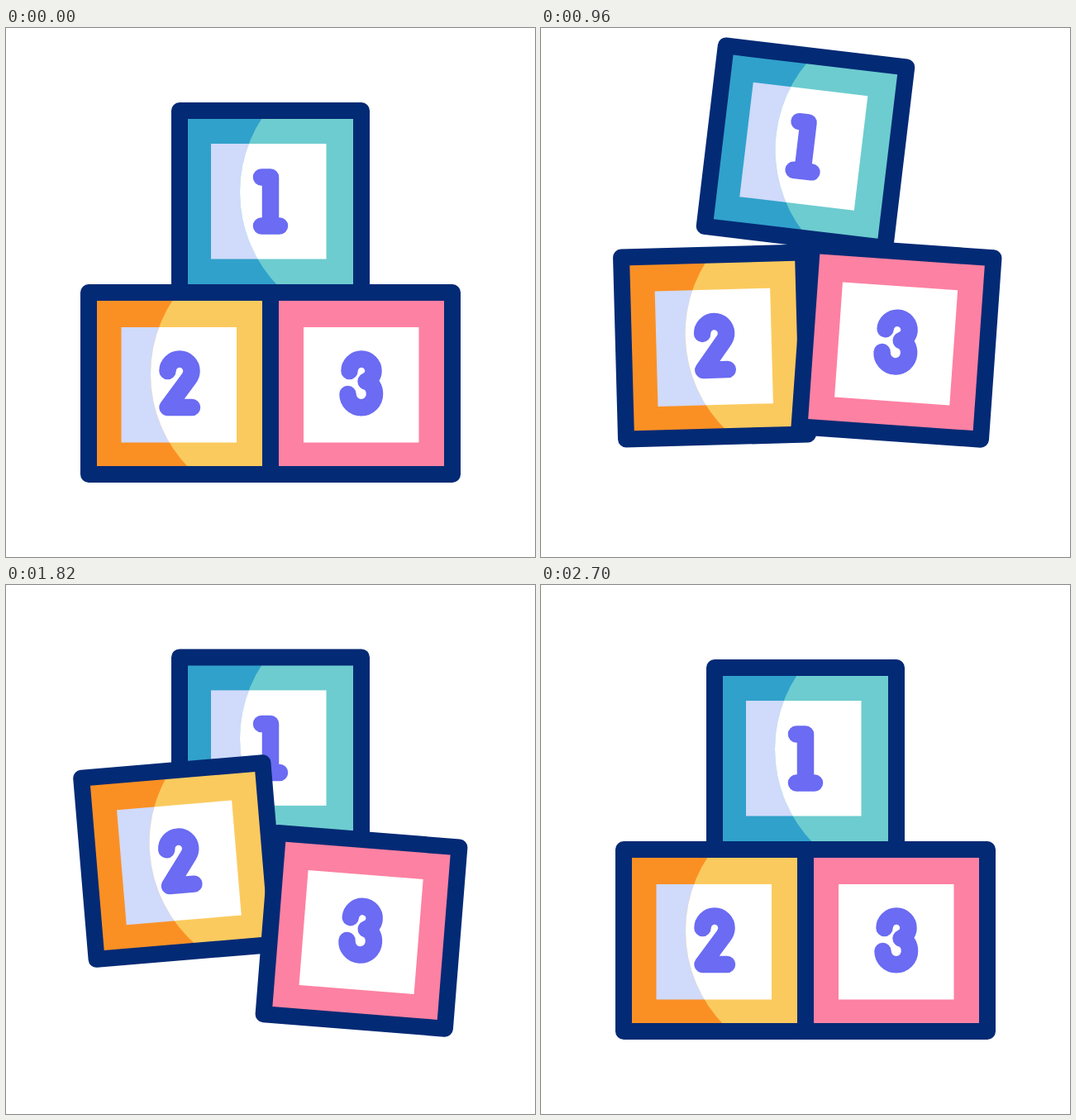
Write an HTML page that moves like this. It is 640 px wide and 640 px high and loops after 3000 ms.

```html
<!DOCTYPE html>
<html lang="en">
<head>
<meta charset="utf-8">
<title>Counting blocks</title>
<style>
html, body { margin: 0; width: 100%; height: 100%; overflow: hidden; background: #fff; }
svg { display: block; width: 100vw; height: 100vh; }
.edge { fill: none; stroke: #032a75; stroke-width: 20; stroke-linejoin: round; }
.digit { fill: none; stroke: #6b6bf3; stroke-width: 20.5; stroke-linecap: round; stroke-linejoin: round; }
</style>
</head>
<body>
<svg id="stage" viewBox="0 0 640 640" xmlns="http://www.w3.org/2000/svg"></svg>
<script>
const LOOP = 3000, STEP = 20;
const stage = document.getElementById('stage');

// Easings
const bez = (x1, x2) => x => {
  let lo = 0, hi = 1, s = 0.5;
  for (let i = 0; i < 24; i++) {
    const r = 1 - s;
    if (3 * r * r * s * x1 + 3 * r * s * s * x2 + s * s * s < x) lo = s; else hi = s;
    s = (lo + hi) / 2;
  }
  return s * s * (3 - 2 * s);
};
const fall = p => x => Math.pow(x, p);
const out = x => 1 - (1 - x) * (1 - x);
const smooth = x => x * x * (3 - 2 * x);

// Tracks hold [time, value, easing towards this key]
const blocks = [
  {
    x: 320, y: 210, fill: '#6dcccf', shade: '#30a1cb', panel: [-72, -70], curve: 126.5,
    digit: 'M-11,-29.5H0V29.5M-11,29.5H11',
    lift: [[210, 0], [1250, -75, bez(.33, .5)], [1270, -75, smooth], [1680, 0, fall(2)],
           [1980, -28, smooth], [2272, 0, fall(2)]],
    turn: [[200, 0], [850, 6.8, smooth], [1270, 6.8, smooth], [1680, 0, fall(2.2)],
           [1820, 0, smooth], [2040, 3.5, smooth], [2300, 0, fall(2)]]
  },
  {
    x: 210, y: 430, fill: '#fbca5e', shade: '#fa9024', panel: [-70.5, -68], curve: 128.5,
    digit: 'M-14.5,-15a14.5,14.5 0 0 1 29,0q0,5 -3.5,9.5L-14.5,29H15',
    lift: [[560, 0], [1840, -96, bez(.33, .2)], [2150, 0, fall(2)],
           [2400, -30, out], [2700, 0, fall(2)]],
    turn: [[560, 0], [1860, -4.8, bez(.33, .4)], [2150, 0, fall(2)],
           [2200, 0, smooth], [2450, -3.4, smooth], [2700, 0, fall(2)]]
  },
  {
    x: 430, y: 430, fill: '#fd81a2', panel: [-70, -68],
    digit: 'M-14.5,-15a14.5,14.5 0 0 1 29,0c0,6 -4,10.5 -9,12.5c7,2 10.5,8 10.5,15.5a16,16 0 0 1 -32.5,0',
    lift: [[330, 0], [1560, -96, smooth], [1840, -3.5, fall(1.25)],
           [2100, -27, out], [2380, 0, fall(2)]],
    turn: [[360, 0], [1580, 8.3, smooth], [1840, 3.9, fall(2)],
           [2180, 5, smooth], [2385, 0, fall(2.4)]]
  }
];

function add(parent, tag, attrs) {
  const el = document.createElementNS('http://www.w3.org/2000/svg', tag);
  for (const k in attrs) el.setAttribute(k, attrs[k]);
  parent.appendChild(el);
  return el;
}

function square(parent, x, y, size, attrs) {
  return add(parent, 'rect', { x, y, width: size, height: size, ...attrs });
}

function build(b, i) {
  const g = add(stage, 'g', {});
  const [px, py] = b.panel;
  square(g, -105, -105, 210, { fill: b.shade || b.fill });
  square(g, px, py, 139.5, { fill: b.shade ? '#d0dafa' : '#fff' });
  if (b.shade) {
    // The lit side is everything inside a large circle
    const clip = add(g, 'clipPath', { id: 'lit' + i });
    add(clip, 'circle', { cx: b.curve, cy: -11.5, r: 163.5 });
    const lit = add(g, 'g', { 'clip-path': `url(#lit${i})` });
    square(lit, -105, -105, 210, { fill: b.fill });
    square(lit, px, py, 139.5, { fill: '#fff' });
  }
  square(g, -110, -110, 220, { class: 'edge' });
  add(g, 'path', { d: b.digit, class: 'digit' });
  b.node = g;
}

function at(track, t) {
  let prev = track[0];
  if (t <= prev[0]) return prev[1];
  for (const key of track.slice(1)) {
    if (t < key[0]) {
      const u = (t - prev[0]) / (key[0] - prev[0]);
      return prev[1] + (key[1] - prev[1]) * key[2](u);
    }
    prev = key;
  }
  return prev[1];
}

function draw(t) {
  for (const b of blocks) {
    const y = b.y + at(b.lift, t);
    b.node.setAttribute('transform', `translate(${b.x} ${y.toFixed(2)}) rotate(${at(b.turn, t).toFixed(3)})`);
  }
}

function tick() {
  const t = performance.now() % LOOP;
  draw(Math.floor(t / STEP) * STEP);
  requestAnimationFrame(tick);
}

blocks.forEach(build);
draw(0);
requestAnimationFrame(tick);
</script>
</body>
</html>
```
